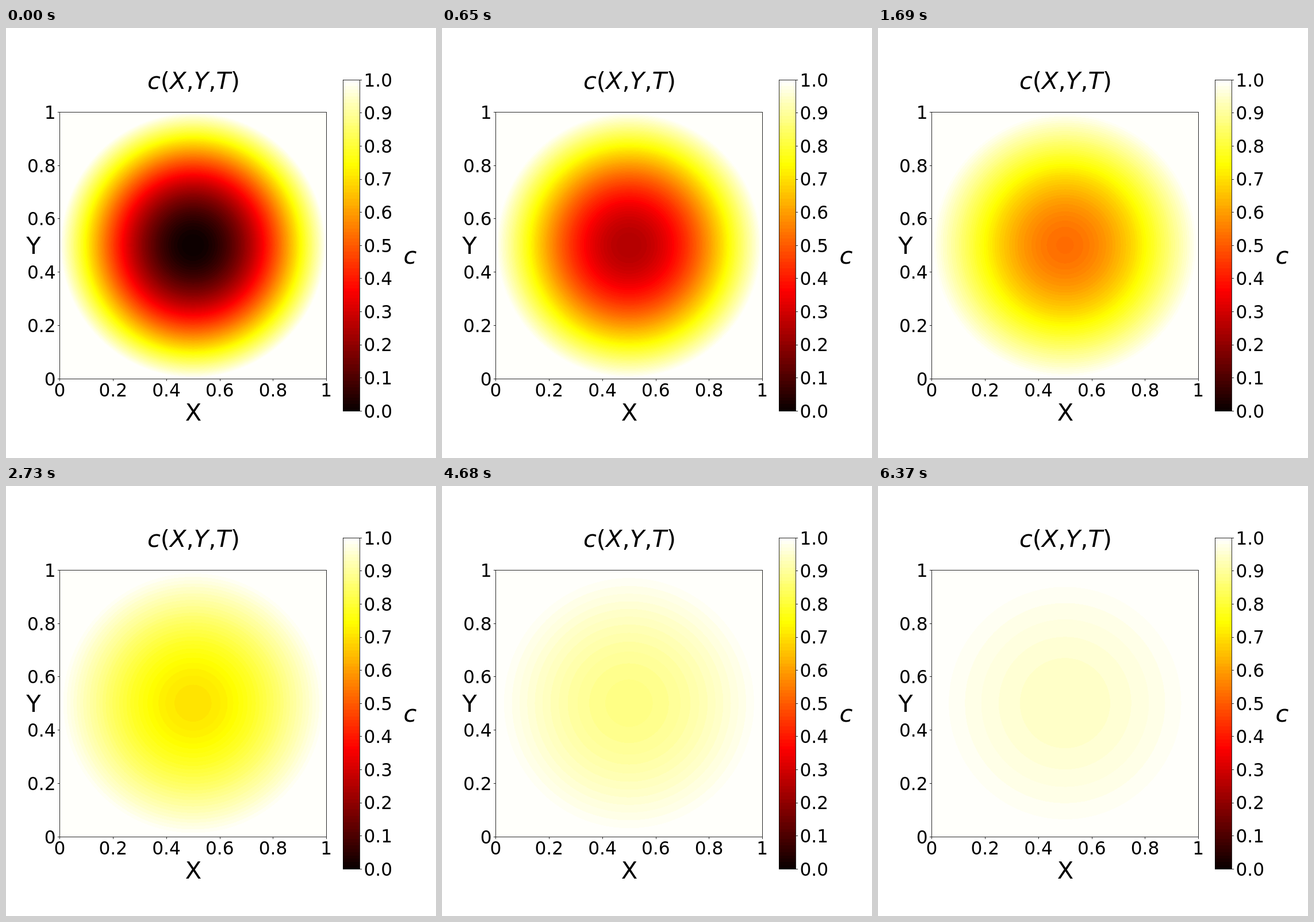
These frames come from a looping animation (748 by 748 pixels, 6500 ms). An HTML page:

```html
<!DOCTYPE html>
<html lang="en">
<head>
<meta charset="utf-8">
<title>Radial diffusion</title>
<style>
  html, body { margin: 0; width: 100%; height: 100%; overflow: hidden; background: #fff; }
  svg { display: block; width: 748px; height: 748px; }
  text { font-family: "DejaVu Sans", sans-serif; font-size: 31.17px; }
  .big { font-size: 41.55px; }
  .it { font-style: oblique; }
  .mid { text-anchor: middle; }
  .end { text-anchor: end; }
  .line { fill: none; stroke: #000; stroke-width: 0.83; }
</style>
</head>
<body>
<svg viewBox="0 0 748 748">
  <g id="field" shape-rendering="crispEdges"></g>
  <g id="bar" shape-rendering="crispEdges"></g>
  <g id="axes"></g>
  <text class="big mid" x="326.5" y="105.5"><tspan class="it">c</tspan>(<tspan class="it">X</tspan>,<tspan class="it">Y</tspan>,<tspan class="it">T</tspan>)</text>
  <text class="big mid" x="326" y="683">X</text>
  <text class="big mid" x="48" y="392.5">Y</text>
  <text class="big it" x="691.5" y="410">c</text>
</svg>
<script>
const LOOP = 6500, STEP = 130, DECAY = 0.0576;
const BANDS = 100, ROOT = 2.404826;
const TICK = 3.64, DROP = 11.9;
const plot = { x: 93.5, y: 145.86, size: 463.76 };
const radius = plot.size / 2;
const scale = { x: 586.2, w: 28.8, top: 89.76, bottom: 665.72 };

const byId = id => document.getElementById(id);
const field = byId('field'), bar = byId('bar'), axes = byId('axes');

function add(parent, tag, attrs, text) {
  const el = document.createElementNS('http://www.w3.org/2000/svg', tag);
  for (const k in attrs) el.setAttribute(k, attrs[k]);
  if (text !== undefined) el.textContent = text;
  parent.appendChild(el);
  return el;
}

const clamp = v => Math.max(0, Math.min(1, v));
// nearest pixel row or column, at its middle
const snap = v => Math.floor(v + 0.49) + 0.5;

function frame(x, y, w, h) {
  const left = snap(x), top = snap(y);
  add(axes, 'rect', { class: 'line', x: left, y: top, width: snap(x + w) - left, height: snap(y + h) - top });
}

// black - red - yellow - white colour map, 256 entries
function heat(value) {
  const v = Math.floor(value * 256) / 255;
  const rgb = [
    0.0416 + 0.9584 * v / 0.365079,
    (v - 0.365079) / 0.380953,
    (v - 0.746032) / 0.253968
  ];
  return `rgb(${rgb.map(c => Math.round(clamp(c) * 255)).join(',')})`;
}

// colour of the band whose depth 1 - c starts at m / BANDS
const bandColor = m => heat((BANDS - 0.5 - m) / BANDS);

// Bessel function J0 by its power series
function j0(x) {
  let term = 1, sum = 1;
  for (let k = 1; k < 14; k++) {
    term *= -x * x / (4 * k * k);
    sum += term;
  }
  return sum;
}

// x in [0, ROOT] with J0(x) = y
function inverseJ0(y) {
  let lo = 0, hi = ROOT;
  for (let i = 0; i < 22; i++) {
    const mid = (lo + hi) / 2;
    if (j0(mid) > y) lo = mid; else hi = mid;
  }
  return (lo + hi) / 2;
}

function drawAxes() {
  const { x, y, size } = plot;
  frame(x, y, size, size);
  for (let i = 0; i <= 5; i++) {
    const label = i % 5 ? (i / 5).toFixed(1) : i / 5;
    const tx = x + size * i / 5, ty = y + size * (1 - i / 5);
    add(axes, 'path', { class: 'line', d: `M${snap(tx)} ${snap(y + size)}v${TICK}M${snap(x)} ${snap(ty)}h${-TICK}` });
    add(axes, 'text', { class: 'mid', x: tx, y: 640.5 }, label);
    add(axes, 'text', { class: 'end', x: 86.5, y: Math.round(ty + DROP) }, label);
  }
}

function drawScale() {
  const { x, w, top, bottom } = scale;
  const h = (bottom - top) / BANDS;
  for (let m = 0; m < BANDS; m++) {
    add(bar, 'rect', { x, y: top + m * h, width: w, height: bottom - top - m * h, fill: bandColor(m) });
  }
  frame(x, top, w, bottom - top);
  for (let i = 0; i <= 10; i++) {
    const ty = bottom - (bottom - top) * i / 10;
    add(axes, 'path', { class: 'line', d: `M${snap(x + w)} ${snap(ty)}h${TICK}` });
    add(axes, 'text', { x: 622.5, y: Math.round(ty + DROP) }, (i / 10).toFixed(1));
  }
}

add(field, 'rect', { x: plot.x, y: plot.y, width: plot.size, height: plot.size, fill: bandColor(0) });
const rings = [];
for (let m = 1; m < BANDS; m++) {
  rings.push(add(field, 'circle', { cx: plot.x + radius, cy: plot.y + radius, r: 0, fill: bandColor(m) }));
}
drawAxes();
drawScale();

let shown = -1;
function render(ms) {
  const n = Math.floor((ms % LOOP) / STEP);
  if (n === shown) return;
  shown = n;
  const depth = Math.exp(-DECAY * n);
  rings.forEach((ring, i) => {
    const level = (i + 1) / BANDS / depth;
    ring.setAttribute('r', level < 1 ? radius * inverseJ0(level) / ROOT : 0);
  });
}

const start = performance.now();
function tick() {
  render(performance.now() - start);
  requestAnimationFrame(tick);
}
render(0);
requestAnimationFrame(tick);
</script>
</body>
</html>
```
